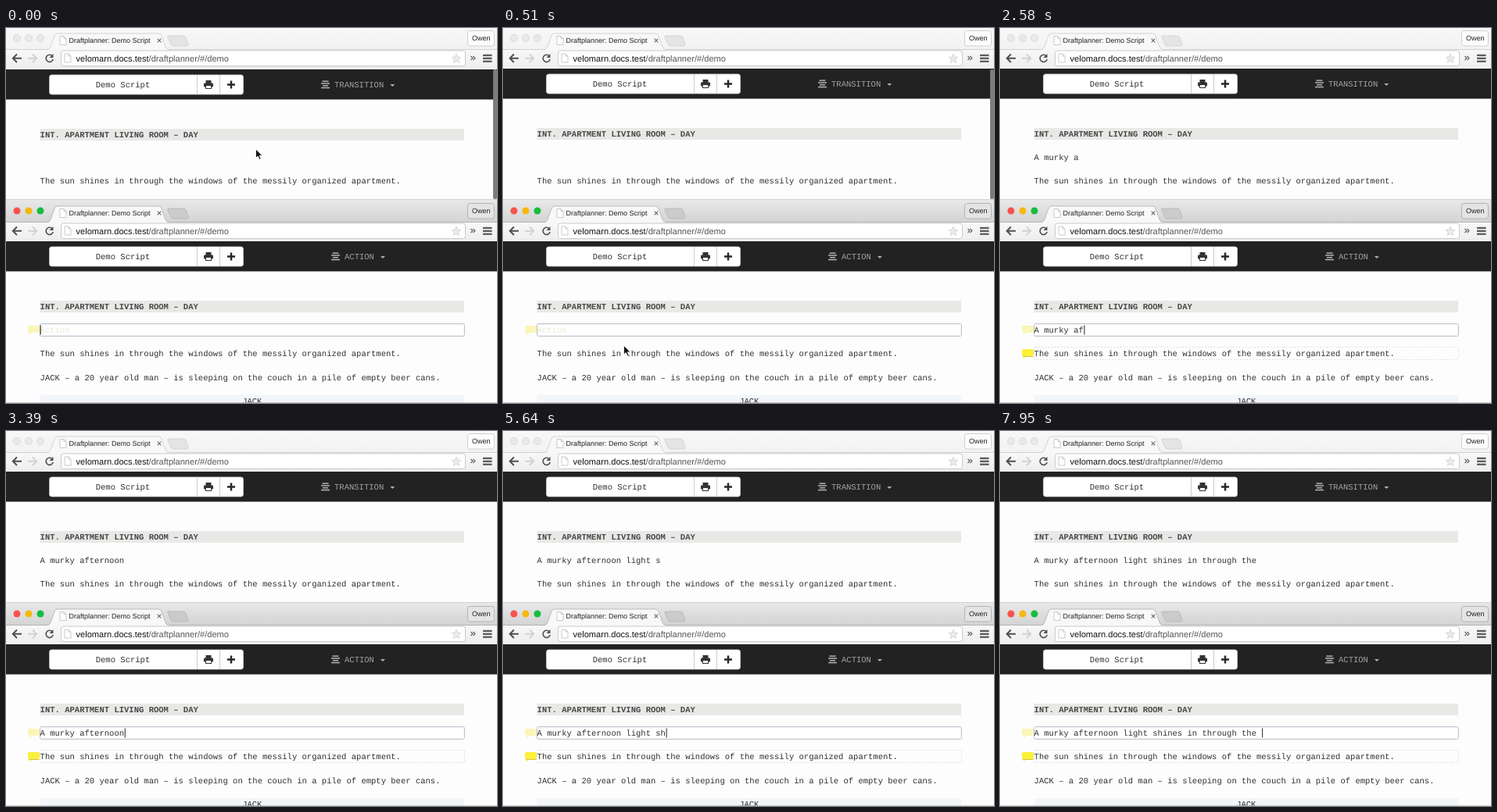
Animation of 628x480 px, one loop 8000 ms. Source, as an HTML page:

```html
<!DOCTYPE html>
<html lang="en">
<head>
<meta charset="utf-8">
<title>Script demo</title>
<style>
  html, body { margin: 0; width: 100%; height: 100%; overflow: hidden; background: #fdfdfe; }
  svg { display: block; width: 628px; height: 480px; }
  text { font: 9px "Liberation Sans", Arial, sans-serif; fill: #222; text-rendering: geometricPrecision; white-space: pre; }
  .mono { font: 10.54px "Liberation Mono", "Courier New", monospace; fill: #303030; }
  .heading { font-weight: bold; fill: #484848; }
  .url { font-size: 11.1px; fill: #555; }
  .url tspan { fill: #111; }
  .nav { fill: #a2a2a2; }
  .mid { text-anchor: middle; }
  .line { fill: none; stroke: #505050; stroke-width: 1.6; }
</style>
</head>
<body>
<svg id="stage" viewBox="0 0 628 480">
  <defs>
    <linearGradient id="idle" x2="0" y2="1"><stop stop-color="#f8f8f8"/><stop offset="1" stop-color="#f2f2f2"/></linearGradient>
    <linearGradient id="busy" x2="0" y2="1"><stop stop-color="#e9e9e9"/><stop offset="1" stop-color="#d3d3d3"/></linearGradient>
    <linearGradient id="bar" x2="0" y2="1"><stop stop-color="#f8f8f8"/><stop offset="1" stop-color="#ededed"/></linearGradient>
    <clipPath id="upper"><rect width="628" height="219"/></clipPath>
    <path id="bubble" d="M2 0H13Q15 0 15 2V7Q15 9 13 9H6L2 12V9Q0 9 0 7V2Q0 0 2 0Z"/>
    <path id="file" d="M0 0H5L8 3V11H0ZM5 0V3H8" fill="#fff" stroke="#c4c4c4" stroke-width=".9"/>
  </defs>
  <g clip-path="url(#upper)"><g id="top"></g></g>
  <g id="bottom" transform="translate(0 221)"></g>
  <path id="pointer" d="M0 0V11.5L2.7 9 4.7 13.3 6.6 12.4 4.7 8.3H8.3Z" fill="#111" stroke="#fff" stroke-width=".8"/>
</svg>
<script>
const $ = id => document.getElementById(id);
const LEFT = 43.6, ADVANCE = 6.325, LOOP = 8000, ECHO_DELAY = 90;

const rect = (x, y, w, h, fill, extra = '') =>
  `<rect x="${x}" y="${y}" width="${w}" height="${h}" fill="${fill}" ${extra}/>`;
const text = (x, y, str, cls = 'mono') => `<text x="${x}" y="${y}" class="${cls}">${str}</text>`;
const path = (d, extra = 'class="line"') => `<path d="${d}" ${extra}/>`;

function chrome(active) {
  const edge = active ? '#b4b4b4' : '#d0d0d0';
  const lights = ['#f9524d', '#f5b80d', '#16bd3f'].map((color, i) =>
    `<circle cx="${14 + 15 * i}" cy="13" r="4.5" fill="${active ? color : '#e9e9e9'}" stroke="${active ? 'none' : '#dadada'}"/>`).join('');
  const menu = [33.8, 37.7, 41.6].map(y => rect(610, y, 11.5, 2.3, '#5c5c5c')).join('');
  return rect(0, -2, 628, 30, `url(#${active ? 'busy' : 'idle'})`) +
    rect(0, 27, 628, 26, 'url(#bar)') +
    path('M0 27.5H55M208 27.5H628', `stroke="${edge}"`) +
    path('M53 28Q56 27 57 24L62 10Q63 7 66 7H195Q198 7 199 10L204 24Q205 27 208 28', `fill="#f8f8f8" stroke="${edge}" stroke-width=".9"`) +
    path('M208 10H227Q229 10 230 12L233 21Q233 23 231 23H214Q212 23 211 21L207 12Q206 10 208 10Z',
      `fill="${active ? '#cbcbcb' : '#e4e4e4'}" stroke="${edge}" stroke-width=".8"`) +
    lights +
    '<use href="#file" x="69" y="10.5"/>' + text(80.5, 19.4, 'Draftplanner: Demo Script', '') +
    path('M193.7 13.7L198.3 18.3M198.3 13.7L193.7 18.3', 'stroke="#6c6c6c" stroke-width="1.2"') +
    rect(590.5, 3.5, 34, 19.5, active ? '#e4e4e4' : '#fcfcfc', `rx="3" stroke="${edge}"`) +
    text(607.7, 16.4, 'Owen', 'mid') +
    path('M20 38.7H9M14 33.5L8.8 38.7 14 44', 'class="line" style="stroke-width:2"') +
    path('M28 38.7H39M34 33.5L39.2 38.7 34 44', 'fill="none" stroke="#d2d2d2" stroke-width="2"') +
    path('M59 35.6A4.6 4.6 0 1 0 60.2 40') + path('M60.5 33V38H55.5Z', 'fill="#505050"') +
    rect(70.5, 29, 517, 19.5, '#fff', 'rx="3" stroke="#cacaca"') +
    '<use href="#file" x="75" y="33"/>' +
    '<text x="89.5" y="42.7" class="url"><tspan>velomarn.docs.test</tspan>/draftplanner/#/demo</text>' +
    path('M576 33L577.7 37 582 37.4 578.7 40.3 579.7 44.5 576 42.2 572.3 44.5 573.3 40.3 570 37.4 574.3 37Z',
      'fill="#eaeaea" stroke="#d2d2d2" stroke-width=".8"') +
    path('M594.5 36L597 38.5 594.5 41M597.5 36L600 38.5 597.5 41', 'fill="none" stroke="#606060" stroke-width="1.1"') +
    menu;
}

function page(mode, x) {
  const end = x + 17 + mode.length * ADVANCE;
  const align = [[1.5, 8], [0, 11], [2, 7], [0, 11]].map(([dx, w], i) =>
    rect(x + dx, 66.4 + i * 2.8, w, 1.5, '#b2b2b2')).join('');
  return rect(0, 90, 628, 170, '#fdfdfe') + rect(0, 52, 628, 38.5, '#222') +
    rect(55.5, 59, 248, 25, '#fff', 'rx="3" stroke="#ccc" stroke-width=".8"') +
    path('M244.5 59V84M273.5 59V84', 'stroke="#ccc"') +
    text(149.5, 75, 'Demo Script', 'mono mid') +
    rect(255.5, 66, 7, 5, '#333') + rect(253, 69.5, 12, 5, '#333', 'rx="1"') +
    rect(255.5, 72.5, 7, 4, '#fff', 'stroke="#333"') +
    path('M288 66.5V76.5M283 71.5H293', 'stroke="#282828" stroke-width="2.5"') +
    align + text(x + 17, 75, mode, 'mono nav') +
    path(`M${end + 8} 71H${end + 14}L${end + 11} 74Z`, 'fill="#b0b0b0"') +
    rect(43.5, 128, 542.5, 15, '#e8e8e6') +
    text(LEFT, 139, 'INT. APARTMENT LIVING ROOM – DAY', 'mono heading');
}

const sunLine = text(LEFT, 199.3, 'The sun shines in through the windows of the messily organized apartment.');

$('top').innerHTML = chrome(false) +
  `<g id="sheet">${page('TRANSITION', 403)}<text id="echo" x="${LEFT}" y="169" class="mono"></text></g>` + sunLine +
  rect(623, 53, 5, 166, '#7c7c7c', 'id="scroll" rx="2"');

$('bottom').innerHTML = chrome(true) + page('ACTION', 416) +
  '<use href="#bubble" x="28" y="160" fill="#f9f6b8"/>' +
  rect(43.5, 157.5, 543, 16, '#fff', 'rx="2" stroke="#c2c2cc"') +
  rect(44.5, 158.5, 541, 14, 'none', 'rx="1" stroke="#f2f2f6"') +
  `<text id="hint" x="${LEFT}" y="169" class="mono" style="fill:#e8e8d4">Action</text>` +
  `<text id="typed" x="${LEFT}" y="169" class="mono"></text>` +
  rect(0, 159.5, 1, 12, '#222', 'id="caret"') +
  '<g id="hover"><use href="#bubble" x="28" y="190" fill="#fbf03a"/>' +
  path('M29 199.5H42.5', 'stroke="#cfc650"') +
  rect(43.5, 187.5, 543, 16, 'none', 'rx="2" stroke="#dedede" stroke-dasharray="2 2"') + '</g>' +
  sunLine +
  text(LEFT, 229.5, 'JACK – a 20 year old man – is sleeping on the couch in a pile of empty beer cans.') +
  rect(43.5, 249, 542.5, 10, '#f2f5f9') +
  text(314.8, 259.5, 'JACK', 'mono mid') + path('M0 258.7H628', 'stroke="#b4b4b4" stroke-width=".8"') +
  path('M0 -1.5H628', 'stroke="#d4d4d4"');

// Bursts of typing: first key, last key, characters
const bursts = [
  [900, 900, 'A'], [1170, 1170, ' '], [1380, 1950, 'murky '], [2280, 2280, 'a'], [2550, 3060, 'fternoon'],
  [4530, 5250, ' light'], [5310, 5820, ' shin'], [6210, 6930, 'es in '], [7050, 7920, 'through the ']
];
const keys = bursts.flatMap(([from, to, str]) => [...str].map((char, i) =>
  ({ char, at: from + (to - from) * i / Math.max(1, str.length - 1) })));
const caretOff = [[450, 870], [3600, 4110], [4480, 4530]];
const moves = [[30, 510, 319.5, 155, 154.5, 406.5], [510, 690, 154.5, 406.5, 150, 413]];

const typedAt = t => keys.filter(k => k.at <= t).map(k => k.char).join('');
const show = (id, on) => $(id).setAttribute('visibility', on ? 'visible' : 'hidden');

function pointerAt(t) {
  const [from, to, x0, y0, x1, y1] = moves[t < 510 ? 0 : 1];
  const p = Math.min(1, Math.max(0, (t - from) / (to - from)));
  const ease = p * p * (3 - 2 * p);
  return [x0 + (x1 - x0) * ease, y0 + (y1 - y0) * ease];
}

function draw() {
  const t = performance.now() % LOOP;
  const typed = typedAt(t);
  const [x, y] = pointerAt(t);

  $('typed').textContent = typed;
  $('echo').textContent = typedAt(t - ECHO_DELAY);
  $('caret').setAttribute('x', LEFT + typed.length * ADVANCE + (typed ? .6 : 0));
  show('caret', !caretOff.some(([from, to]) => t >= from && t < to));
  show('hint', !typed);
  $('sheet').setAttribute('transform', `translate(0 ${t < 30 ? 1 : 0})`);

  $('pointer').setAttribute('transform', `translate(${x} ${y})`);
  show('pointer', t < 900);
  show('hover', y > 408);
  $('scroll').setAttribute('opacity', Math.min(1, Math.max(0, (960 - t) / 150)));
  requestAnimationFrame(draw);
}
draw();
</script>
</body>
</html>
```
